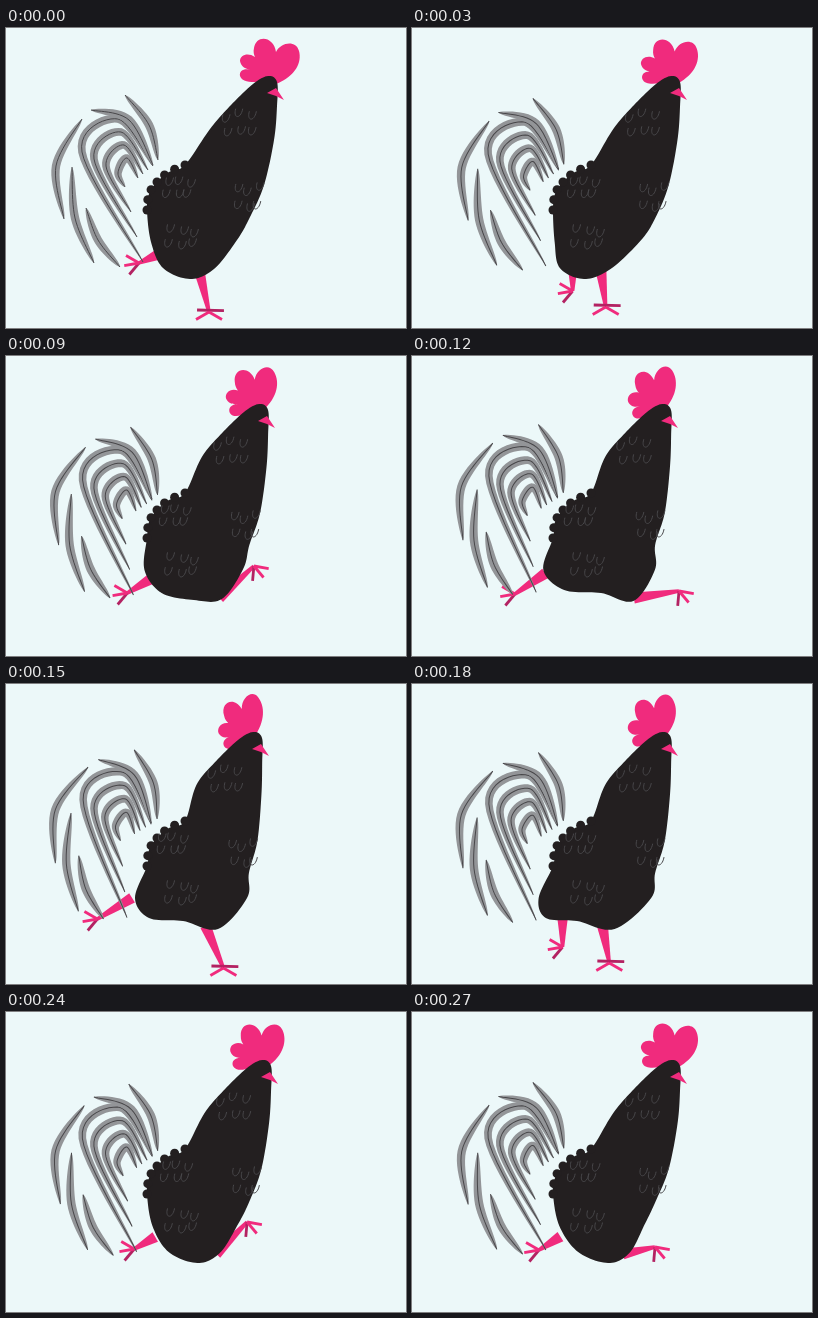
Recreate the animation shown at these times as an HTML page with a canvas. Size 400 by 300 pixels, loop 0.3 s.

```html
<!DOCTYPE html>
<html lang="en">
<head>
<meta charset="utf-8">
<title>Running rooster</title>
<style>
html, body { margin: 0; width: 100%; height: 100%; overflow: hidden; background: #ecf8f9; }
canvas { display: block; }
</style>
</head>
<body>
<canvas id="stage" width="400" height="300"></canvas>
<script>
const ctx = document.getElementById('stage').getContext('2d');
const STEP = 30, POSES = 10, CENTER = 185;
const SKY = '#ecf8f9', PINK = '#f02b7d', DARK_PINK = '#b32262';
const BLACK = '#231f20', GRAY = '#939598', LINE = '#48474a';

// Nested arches, then single blades around them.
const tail = [
  ...[0, 1, 2, 3].map(i => [[147 - 5 * i, 138 + 4 * i], [112 + 3 * i, 91 + 13 * i],
    [76 + 12 * i, 124 + 7 * i], [137 - 6 * i, 234 - 25 * i]]),
  [[76, 91], [50, 138], [58, 191]],
  [[66, 139], [69, 190], [88, 235]],
  [[80, 180], [92, 212], [114, 239]],
  [[85, 82], [123, 92], [147, 137]],
  [[119, 67], [143, 97], [152, 132]]
];

const shoulder = [[141, 182], [143, 166], [151, 154], [163, 144], [179, 137]];
const neck = [[204, 101], [225, 77], [247, 56], [262, 48], [271, 54]];
const chest = [[271, 78], [268, 112], [258, 157], [244, 189]];
const bellyNarrow = [[231, 212], [208, 241], [184, 251], [157, 240], [145, 214]];
const bellyWide = [[241, 214], [212, 245], [177, 237], [143, 234], [129, 214]];

// Foot path over one stride: reach from the centre (-1 to 1) and height.
const stride = [[0.36, 284], [0.15, 279], [-0.26, 280], [-0.86, 237], [-1, 238],
  [-1.04, 235], [-0.42, 263], [0.26, 261], [0.85, 210], [1, 235]];

const comb = new Path2D('M270 56C290 48 296 34 293 23C290 12 275 14 270 24' +
  'C268 8 250 6 248 20C247 24 248 27 249 29C242 24 234 27 234 33C235 39 240 41 245 42' +
  'C238 40 233 43 234 48C236 54 244 54 251 54L262 60Z');

let seed = 7;
const random = () => (seed = seed * 16807 % 2147483647) / 2147483647;
const plumes = [[234, 93], [242, 168], [172, 158], [176, 208]].flatMap(([x, y]) =>
  Array.from({ length: 6 }, (_, i) =>
    [x + (i % 3 - 1) * 11 + random() * 6 - 3, y + (i < 3 ? -7 : 8) + random() * 8 - 4]));

function spline(points, closed) {
  const n = points.length, out = [], count = closed ? n : n - 1;
  const at = i => points[closed ? (i + n) % n : Math.max(0, Math.min(n - 1, i))];
  for (let i = 0; i < count; i++) {
    const [a, b, c, d] = [at(i - 1), at(i), at(i + 1), at(i + 2)];
    for (let j = 0; j < 12; j++) {
      const t = j / 12;
      out.push([0, 1].map(k => b[k] + t / 2 * (c[k] - a[k] +
        t * (2 * a[k] - 5 * b[k] + 4 * c[k] - d[k] + t * (3 * (b[k] - c[k]) + d[k] - a[k])))));
    }
  }
  if (!closed) out.push(points[n - 1]);
  return out;
}

function trace(points) {
  ctx.beginPath();
  points.forEach(p => ctx.lineTo(...p));
}

function fill(points, color) {
  trace(points);
  ctx.fillStyle = color;
  ctx.fill();
}

function stroke(points, color, width) {
  trace(points);
  ctx.strokeStyle = color;
  ctx.lineWidth = width;
  ctx.stroke();
}

function drawFeather(points) {
  const mid = spline(points), last = mid.length - 1;
  const side = sign => mid.map(([x, y], i) => {
    const a = mid[Math.max(0, i - 1)], b = mid[Math.min(last, i + 1)];
    const angle = Math.atan2(b[1] - a[1], b[0] - a[0]);
    const w = sign * 4.2 * Math.sin(Math.PI * i / last) ** 0.7;
    return [x - w * Math.sin(angle), y + w * Math.cos(angle)];
  });
  fill([...side(1), ...side(-1).reverse()], GRAY);
  stroke(mid, LINE, 1);
}

function drawTail(p) {
  ctx.save();
  ctx.translate(112 - 3 * p, 149 + 4.5 * Math.sin(1.25 * Math.PI * p));
  ctx.rotate(0.15 * p);
  ctx.translate(-112, -149);
  tail.forEach(drawFeather);
  ctx.restore();
}

function drawLeg(phase, p) {
  const [reach, y] = stride[phase], dx = reach * (50 + 40 * p), x = CENTER + dx;
  const grounded = phase < 3, low = y > 250;
  const hx = CENTER + dx * (dx > 0 ? 0.45 : low ? 1 : 0.63);
  const hy = 242 - 0.3 * Math.max(0, -dx);
  const angle = Math.atan2(y - hy, x - hx), s = Math.sin(angle), c = Math.cos(angle);
  fill([[hx - 5.5 * s, hy + 5.5 * c], [x - 1.7 * s, y + 1.7 * c],
    [x + 1.7 * s, y - 1.7 * c], [hx + 5.5 * s, hy - 5.5 * c]], PINK);
  const toes = grounded ? [-5, 150, 30] : phase < 8 ? [130, 170, 210] : [95, 50, 10];
  toes.forEach((degrees, i) => {
    const a = degrees * Math.PI / 180;
    const tip = [x + 15 * Math.cos(a), y + 15 * Math.sin(a)];
    const heel = grounded ? [x - 12 * Math.cos(a), y - 2] : [x, y];
    stroke([i ? [x, y] : heel, tip], i ? PINK : DARK_PINK, 2.8);
  });
}

function drawHead(p) {
  ctx.save();
  ctx.translate(264 - 20 * p, 57);
  ctx.scale(1 - 0.17 * p, 1);
  ctx.rotate(-0.48 * p);
  ctx.translate(-264, -57);
  ctx.fillStyle = PINK;
  ctx.fill(comb);
  ctx.restore();
}

function drawBody(k, p) {
  const lean = ([x, y]) =>
    [x - 15 * p * Math.sin(Math.PI / 2 * Math.max(0, Math.min(1, (195 - y) / 130))), y];
  const t = Math.max(0, Math.min(1, (p - 0.4) / 0.4)), spread = t * t * (3 - 2 * t);
  const sway = -11 * Math.sin(4 * Math.PI * k / POSES);
  const belly = bellyNarrow.map(([x, y], i) => {
    const [wx, wy] = bellyWide[i];
    return [x + (wx - x) * spread + sway * (y - 205) / 40, y + (wy - y) * spread];
  });
  fill(spline([...shoulder, ...neck.map(lean), ...chest.map(lean), ...belly], true), BLACK);
  spline(shoulder).filter((_, i) => i % 8 === 0).forEach(([x, y]) => {
    ctx.beginPath();
    ctx.arc(x, y, 4.5, 0, 7);
    ctx.fill();
  });
  ctx.strokeStyle = LINE;
  ctx.lineWidth = 1;
  for (const [x, y] of plumes.map(lean)) {
    ctx.beginPath();
    ctx.moveTo(x - 3, y - 3);
    ctx.bezierCurveTo(x - 6, y + 7, x + 2, y + 8, x + 4, y - 3);
    ctx.stroke();
  }
}

function drawBeak(p) {
  const shift = -15 * p;
  fill([[261 + shift, 65], [270 + shift, 60], [278 + shift, 72], [270 + shift, 68]], PINK);
}

function draw() {
  const k = Math.floor(performance.now() / STEP) % POSES;
  const p = 1 - Math.abs(1 - k / 5);
  ctx.fillStyle = SKY;
  ctx.fillRect(0, 0, 400, 300);
  drawLeg(k, p);
  drawLeg((k + 5) % POSES, p);
  drawTail(p);
  drawHead(p);
  drawBody(k, p);
  drawBeak(p);
  requestAnimationFrame(draw);
}
draw();
</script>
</body>
</html>
```
